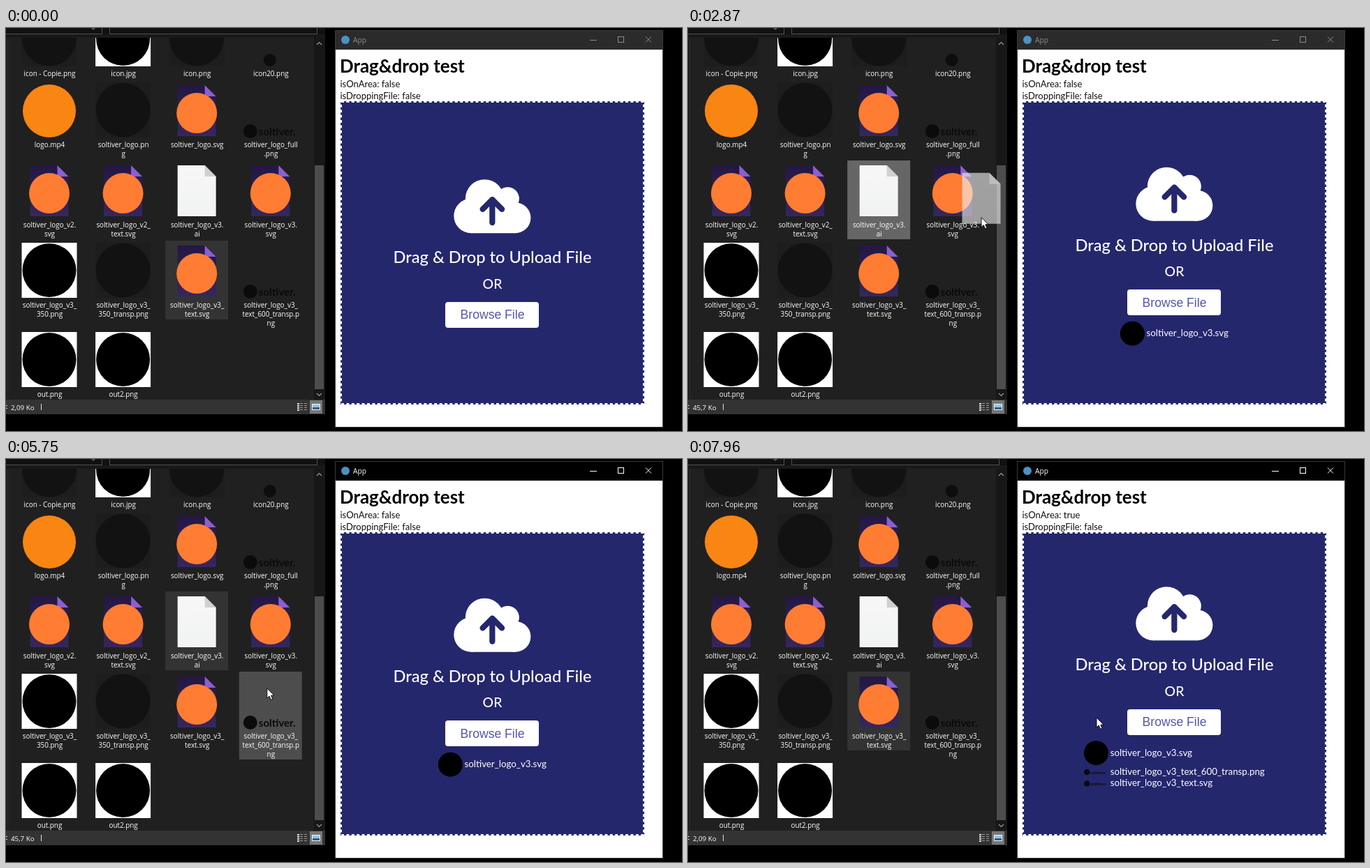
An HTML page with a canvas for the animation above (8 s loop, 968 by 578 pixels).

```html
<!DOCTYPE html>
<html lang="en">
<head>
<meta charset="utf-8">
<title>Drag&amp;drop test</title>
<style>
html, body { margin: 0; width: 100%; height: 100%; overflow: hidden; background: #000; }
canvas { display: block; }
</style>
</head>
<body>
<canvas id="stage" width="968" height="578"></canvas>
<script>
const c = document.getElementById('stage').getContext('2d');
const LOOP = 8000;
const UI = '"Open Sans", "Noto Sans", sans-serif';
const PAGE = 'Lato, "Open Sans", sans-serif';
const NAVY = '#25276d';
const AREA = { x: 479, y: 105, size: 435 };

// ---------- helpers ----------
function rect(x, y, w, h, fill) {
  c.fillStyle = fill;
  c.fillRect(x, y, w, h);
}
function frame(x, y, w, h, color, width = 1) {
  c.strokeStyle = color;
  c.lineWidth = width;
  c.strokeRect(x, y, w, h);
}
function disc(x, y, r, fill) {
  c.fillStyle = fill;
  c.beginPath();
  c.arc(x, y, r, 0, Math.PI * 2);
  c.fill();
}
function poly(points, fill) {
  c.beginPath();
  points.forEach(([x, y]) => c.lineTo(x, y));
  c.closePath();
  c.fillStyle = fill;
  c.fill();
}
function line(points, color, width = 1) {
  c.beginPath();
  points.forEach(([x, y]) => c.lineTo(x, y));
  c.strokeStyle = color;
  c.lineWidth = width;
  c.stroke();
}
function chevron(x, y, r, color) {
  line([[x - Math.abs(r), y + r], [x, y], [x + Math.abs(r), y + r]], color, 1.2);
}
function cross(x, y, r, color) {
  line([[x - r, y - r], [x + r, y + r]], color);
  line([[x + r, y - r], [x - r, y + r]], color);
}
function text(str, x, y, font, fill, align = 'left') {
  c.font = font;
  c.fillStyle = fill;
  c.textAlign = align;
  c.fillText(str, x, y);
}
const inBox = (p, x, y, w, h) => p.x >= x && p.x < x + w && p.y >= y && p.y < y + h;

// ---------- files: a grid of four columns, each row as tall as its longest label ----------
const files = `dark:icon - Copie.png
white:icon.jpg
dark:icon.png
small:icon20.png
video:logo.mp4
dark:soltiver_logo.pn|g
web:soltiver_logo.svg
word:soltiver_logo_full|.png
web:soltiver_logo_v2.|svg
web:soltiver_logo_v2_|text.svg
doc:soltiver_logo_v3.|ai
web:soltiver_logo_v3.|svg
white:soltiver_logo_v3_|350.png
dark:soltiver_logo_v3_|350_transp.png
web:soltiver_logo_v3_|text.svg
word:soltiver_logo_v3_|text_600_transp.p|ng
white:out.png
white:out2.png`.split('\n').map(entry => {
  const [kind, label] = entry.split(':');
  return { kind, lines: label.split('|'), name: label.replaceAll('|', '') };
});
for (let i = 0, y = -24; i < files.length; i += 4) {
  const row = files.slice(i, i + 4);
  row.forEach((f, col) => Object.assign(f, { x: 62 + 105.6 * col, y }));
  y += 89 + 13 * Math.max(...row.map(f => f.lines.length));
}
const boxOf = f => [f.x - 45, f.y - 3, 90, 87 + 13 * f.lines.length];

function sheet(x, y, top, bottom, fold) {
  const g = c.createLinearGradient(0, y, 0, y + 73);
  g.addColorStop(0, top);
  g.addColorStop(1, bottom);
  const r = 27.5, cut = 16;
  poly([[x - r, y], [x + r - cut, y], [x + r, y + cut], [x + r, y + 73], [x - r, y + 73]], g);
  poly([[x + r - cut, y], [x + r, y + cut], [x + r - cut, y + cut]], fold);
}
function wordmark(x, y, r) {
  disc(x + r, y, r, '#0b0b0b');
  text('soltiver.', x + r * 2.2, y + r * 0.62, `bold ${r * 1.5}px ${PAGE}`, '#0b0b0b');
}
const icons = {
  dark(x, y) {
    rect(x - 39.5, y, 79, 79, '#1d1d1d');
    disc(x, y + 39.5, 39, '#121212');
  },
  white(x, y) {
    rect(x - 39.5, y, 79, 79, '#fff');
    disc(x, y + 39.5, 38.5, '#000');
  },
  small(x, y) { disc(x - 1, y + 70, 9, '#0d0d0d'); },
  video(x, y) { disc(x, y + 41, 38, '#f98512'); },
  web(x, y) {
    sheet(x, y + 4, '#241744', '#35275f', '#8a5fd0');
    disc(x, y + 44, 29, '#ff7c33');
  },
  doc(x, y) { sheet(x, y + 4, '#f7f7f7', '#f1f2f2', '#cfd0d1'); },
  word(x, y) { wordmark(x - 39, y + 70, 10); },
};

// ---------- story: every drag picks a file up and lets it go at a spot in the app ----------
const find = name => files.find(f => f.name === 'soltiver_logo_' + name);
const drags = [
  { file: find('v3.svg'), size: '473 octet(s)', press: 1170, drop: 1840, spot: [638, 360] },
  { file: find('v3.ai'), size: '45,7 Ko', press: 2660, drop: 3060, spot: [553, 290], alert: true, focus: 3990 },
  { file: find('v3.ai'), size: '45,7 Ko', press: 4350, drop: 4800, spot: [688, 302], alert: true, focus: 5480, silent: true },
  { file: find('v3_text_600_transp.png'), size: '8,40 Ko', press: 6290, drop: 6700, spot: [628, 500] },
  { file: find('v3_text.svg'), size: '2,09 Ko', press: 7300, drop: 7720, spot: [585, 371], focus: 7740 },
];
const ENTER = 90, REST = 100, ALERT_DELAY = 140;
const OK_SPOT = [390, 253];

// Travel time grows with distance but never runs past the deadline.
const path = [{ t: ENTER, x: 778, y: 505 }];
function stay(t) { path.push({ ...path.at(-1), t }); }
function go([x, y], deadline) {
  const from = path.at(-1);
  const travel = 180 + 1.1 * Math.hypot(x - from.x, y - from.y);
  path.push({ t: Math.min(from.t + travel, deadline), x, y });
}
for (const d of drags) {
  const { x, y } = d.file;
  go([x - 5, y + 21], d.press - 40);
  path.push({ t: d.press, x: x - 10, y: y + 57 });
  go(d.spot, d.drop);
  stay(d.drop + REST);
  if (d.alert) {
    go(OK_SPOT, d.focus);
    stay(d.focus);
  }
}

function pointer(t) {
  if (t < ENTER) return null;
  const i = path.findIndex(p => p.t > t);
  if (i < 0) return path.at(-1);
  const a = path[i - 1], b = path[i];
  const u = (t - a.t) / (b.t - a.t), k = u * u * (3 - 2 * u);
  return { x: a.x + (b.x - a.x) * k, y: a.y + (b.y - a.y) * k };
}

function stateAt(t) {
  const p = pointer(t);
  const begun = drags.findLast(d => t >= d.press);
  const drag = begun || drags.at(-1);
  const held = !!begun && t < drag.drop;
  const waiting = !!begun && !!drag.alert && t < drag.focus;
  const modal = waiting && t >= drag.drop + ALERT_DELAY;
  const inArea = !!p && inBox(p, AREA.x, AREA.y, AREA.size, AREA.size);
  return {
    p, drag, held, modal,
    active: !!begun && t >= drag.focus,
    over: held && inArea && !drag.silent,
    onArea: inArea && !held && !waiting,
    hover: p && !held && !modal && files.find(f => inBox(p, ...boxOf(f))),
    rows: drags.filter(d => !d.alert && t >= d.drop).map(d => d.file.name),
  };
}

// ---------- explorer ----------
function explorer({ drag, held, hover }) {
  rect(0, 0, 457, 554, '#191919');
  rect(0, 0, 457, 9, '#111');
  frame(-5.5, -5.5, 143, 14, '#505050');
  frame(148.5, -5.5, 297, 14, '#505050');
  chevron(125, 2, -3, '#777');
  rect(3, 14, 452, 519, '#202020');
  rect(2, 14, 1, 519, '#2e2e2e');

  c.save();
  c.beginPath();
  c.rect(3, 14, 438, 519);
  c.clip();
  for (const f of files) {
    if (f === drag.file) rect(...boxOf(f), held ? '#666' : '#333');
    else if (f === hover) rect(...boxOf(f), '#4d4d4d');
    icons[f.kind](f.x, f.y);
    f.lines.forEach((s, i) => text(s, f.x + 0.5, f.y + 93 + 13 * i, `9.9px ${UI}`, '#fff', 'center'));
  }
  c.restore();

  rect(441, 14, 15, 519, '#171717');
  rect(442, 197, 13, 321, '#4d4d4d');
  chevron(448.5, 20.5, 3.5, '#999');
  chevron(448.5, 527.5, -3.5, '#999');

  rect(0, 533, 457, 21, '#333');
  rect(0, 541, 2, 1, '#ccc');
  rect(0, 545, 2, 1, '#ccc');
  text(drag.size, 7, 548, `9.8px ${UI}`, '#fff');
  rect(Math.round(16 + c.measureText(drag.size).width), 539, 1, 9, '#ddd');
  for (let y = 538; y < 549; y += 3) {
    rect(417, y, 3, 2, '#ddd');
    rect(421, y, 4, 1, '#999');
    rect(427, y, 4, 1, '#999');
  }
  rect(435, 534, 18, 19, '#777');
  rect(438, 539, 12, 9, '#f2f2f2');
  rect(439, 540, 10, 4, '#8fc6ec');
  rect(439, 544, 10, 3, '#3c5a86');
}

// ---------- app window ----------
function cloud(x, y) {
  c.save();
  c.translate(x, y);
  c.scale(0.172, 0.172);
  disc(144, 336, 144, '#fff');
  disc(256, 192, 160, '#fff');
  disc(448, 192, 96, '#fff');
  disc(512, 352, 128, '#fff');
  rect(144, 260, 368, 220, '#fff');
  c.lineCap = c.lineJoin = 'round';
  line([[320, 202], [320, 392]], NAVY, 48);
  line([[240, 280], [320, 200], [400, 280]], NAVY, 48);
  c.restore();
}

function app({ active, onArea, over, rows }) {
  const ink = active ? '#fff' : '#8c8c8c';
  rect(471, 3, 470, 570, '#3a3a3a');
  rect(472, 4, 468, 27, active ? '#000' : '#2b2b2b');
  disc(486, 17, 6, '#4a92c4');
  text('App', 497, 21, `10.2px ${UI}`, ink);
  line([[836, 17.5], [846, 17.5]], ink);
  frame(876.5, 12.5, 8, 8, ink);
  cross(920, 16.5, 4, ink);

  rect(472, 31, 468, 541, '#fff');
  text('Drag&drop test', 478, 64, `bold 25.9px ${PAGE}`, '#000');
  text(`isOnArea: ${onArea}`, 478.5, 85, `13px ${PAGE}`, '#111');
  text(`isDroppingFile: ${over}`, 478.5, 101.5, `13px ${PAGE}`, '#111');

  const { x, y, size } = AREA;
  rect(x, y, size, size, NAVY);
  if (!over) c.setLineDash([4, 3.4]);
  frame(x + 1, y + 1, size - 2, size - 2, '#fff', 2);
  c.setLineDash([]);

  // The content is centred, so it rises by half the height of the list.
  const mid = x + size / 2, rowH = 16.5;
  const dy = rows.length ? -(35 + rowH * (rows.length - 1)) / 2 : 0;
  cloud(641.3, 211.7 + dy);
  text('Drag & Drop to Upload File', mid, 337 + dy, `500 23.7px ${PAGE}`, '#fff', 'center');
  text('OR', mid, 373.5 + dy, `500 19.4px ${PAGE}`, '#fff', 'center');
  c.fillStyle = '#fff';
  c.beginPath();
  c.roundRect(629, Math.floor(393 + dy), 134, 37, 4);
  c.fill();
  text('Browse File', mid, 417 + dy, '17.6px "Liberation Sans", Arial, sans-serif', '#5256ad', 'center');

  c.font = `13.3px ${PAGE}`;
  const widest = Math.max(0, ...rows.map(s => c.measureText(s).width));
  const left = mid - (widest + 38) / 2;
  rows.forEach((name, i) => {
    const cy = 455.7 + dy + (i && 10.3 + rowH * i);
    if (i) wordmark(left, cy + 0.5, 4.3);
    else disc(left + 17.5, cy, 17.5, '#000');
    text(name, left + 37.7, cy + 4, `13.3px ${PAGE}`, '#fff');
  });
}

// ---------- dialog and pointer ----------
function dialog() {
  rect(232, 139, 222, 131, '#fff');
  rect(232, 234, 222, 36, '#f0f0f0');
  text('VBConsole', 239.5, 156, `9.9px ${UI}`, '#000');
  cross(440, 151.5, 4.2, '#111');
  disc(264.5, 199, 14, '#9aa6b8');
  disc(264.5, 199, 12.8, '#e6ecf5');
  disc(264.5, 199, 11.8, '#2452b4');
  text('i', 264.5, 206, 'bold 20px "Liberation Serif", serif', '#fff', 'center');
  text('Only image files are supported.', 286.5, 204, `9.6px ${UI}`, '#000');
  rect(367, 241, 73, 21, '#555');
  rect(368, 242, 71, 19, '#fff');
  rect(369, 243, 70, 18, '#8a8a8a');
  rect(369, 243, 69, 17, '#ececec');
  text('OK', 403.5, 255.5, `9.6px ${UI}`, '#000', 'center');
}

function ghost(p, file) {
  if (Math.hypot(p.x - file.x, p.y - file.y - 45) < 24) return;
  c.globalAlpha = 0.6;
  icons[file.kind](p.x, p.y - 68);
  c.globalAlpha = 1;
}

function arrow({ x, y }) {
  const shape = [[0, 0], [0, 14], [3.2, 11], [5.6, 16.2], [8, 15.2], [5.8, 10.2], [10, 10]];
  const pts = shape.map(([a, b]) => [x + a, y + b]);
  poly(pts, '#fff');
  line([...pts, pts[0]], '#000', 0.9);
}

function draw(t) {
  const s = stateAt(t);
  rect(0, 0, 968, 578, '#000');
  explorer(s);
  app(s);
  if (s.modal) dialog();
  if (s.held) ghost(s.p, s.drag.file);
  if (s.p) arrow(s.p);
}

const start = performance.now();
function tick() {
  draw((performance.now() - start) % LOOP);
  requestAnimationFrame(tick);
}
tick();
</script>
</body>
</html>
```
